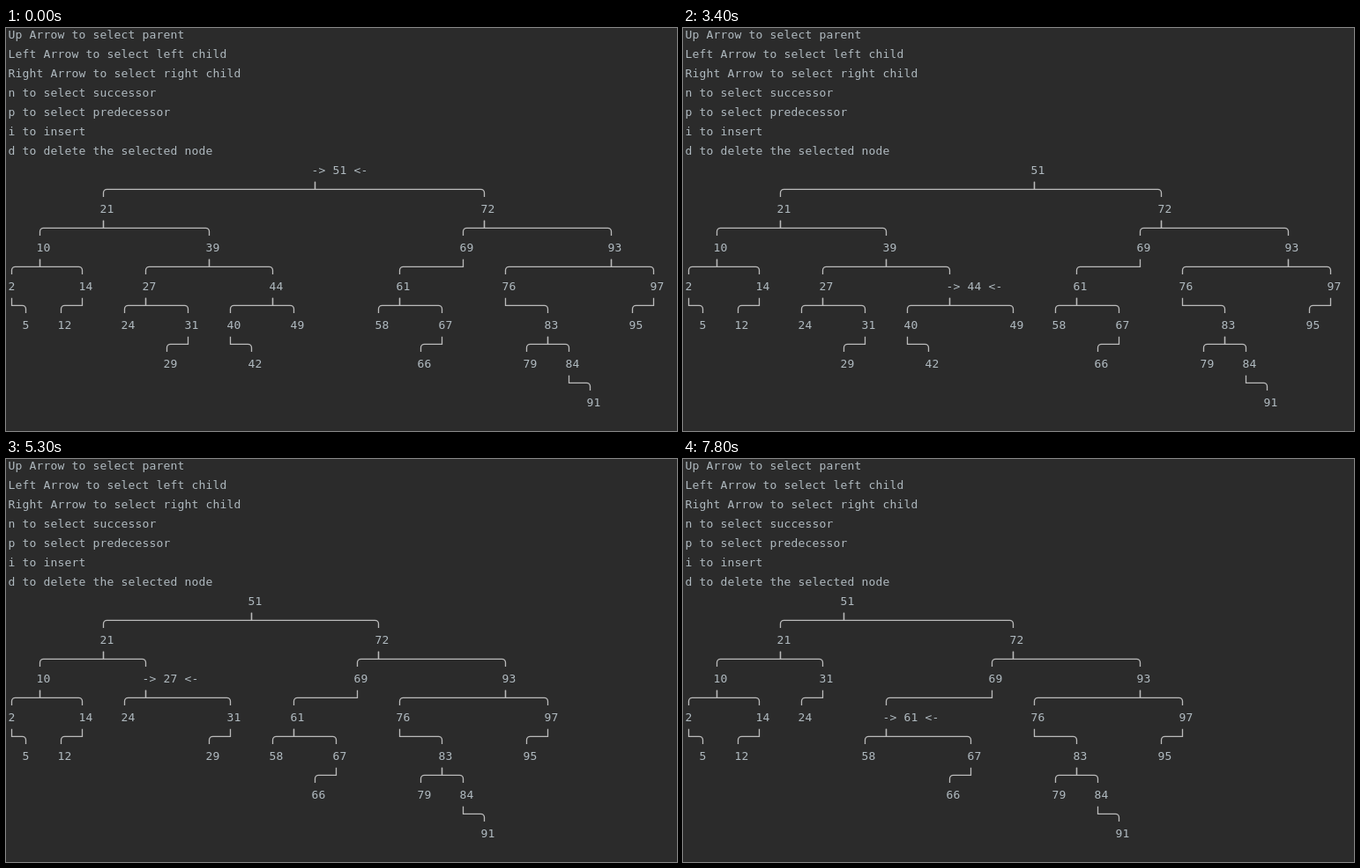
An HTML page with a canvas that plays this animation: 761 px wide and 458 px high, repeating every 8000 ms.

```html
<!DOCTYPE html>
<html lang="en">
<head>
<meta charset="utf-8">
<title>Binary search tree</title>
<style>
html, body { margin: 0; width: 100%; height: 100%; overflow: hidden; background: #2b2b2b; }
canvas { display: block; }
</style>
</head>
<body>
<canvas id="stage" width="761" height="458"></canvas>
<script>
const ctx = document.getElementById('stage').getContext('2d', { alpha: false });
const LOOP = 8000, CELL = 8, ROW = 22, CENTER = 6.5, BASE = 12;
const INK = '#b0bac0', LINE = '#bbbbbb';

const HELP = [
  'Up Arrow to select parent',
  'Left Arrow to select left child',
  'Right Arrow to select right child',
  'n to select successor',
  'p to select predecessor',
  'i to insert',
  'd to delete the selected node'
];

// Insertion order of the keys
const KEYS = '51 21 10 2 5 14 12 39 27 24 31 29 44 40 42 49 72 69 61 58 67 66 93 76 83 79 84 91 97 95';

// Key presses, each with its time in tenths of a second
const PRESSES = '7n 10n 13n 15n 16n 17n 24p 26pp 28p 30p 31p 33p 34p 36p 37p 38p ' +
  '46d 48d 50d 52d 53d 55d 57d 60p 62p 64p 65p 69n 72n 73n 74n 76n 77n 78n';

function insert(node, key) {
  if (!node) return { key, left: null, right: null };
  const side = key < node.key ? 'left' : 'right';
  node[side] = insert(node[side], key);
  return node;
}

function find(node, key) {
  while (node.key !== key) node = key < node.key ? node.left : node.right;
  return node;
}

function first(node) {
  while (node.left) node = node.left;
  return node;
}

function remove(node, key) {
  if (key !== node.key) {
    const side = key < node.key ? 'left' : 'right';
    return { ...node, [side]: remove(node[side], key) };
  }
  if (!node.right) return node.left;
  const next = first(node.right).key;
  return { key: next, left: node.left, right: remove(node.right, next) };
}

const inOrder = node => node ? [...inOrder(node.left), node.key, ...inOrder(node.right)] : [];

function press({ root, selected }, command) {
  if (command === 'd') {
    const { left, right } = find(root, selected);
    return { root: remove(root, selected), selected: right ? first(right).key : left.key };
  }
  const keys = inOrder(root);
  const step = command === 'n' ? 1 : -1;
  return { root, selected: keys[keys.indexOf(selected) + step] };
}

// One state per press, each starting at its time
const fullTree = KEYS.split(' ').map(Number).reduce(insert, null);
const states = [{ start: 0, root: fullTree, selected: fullTree.key }];
for (const token of PRESSES.split(' ')) {
  const commands = token.replace(/\d/g, '');
  const state = [...commands].reduce(press, states[states.length - 1]);
  states.push({ ...state, start: parseInt(token, 10) * 100 });
}

const centerX = col => col * CELL + CENTER;

function drawText(text, col, row) {
  [...text].forEach((ch, i) => ctx.fillText(ch, centerX(col + i), BASE + row * ROW));
}

// Each node takes its label's width plus one column, in key order.
function layout(node, selected, depth = 0, col = 0) {
  if (!node) return col;
  col = layout(node.left, selected, depth + 1, col);
  node.label = node.key === selected ? `-> ${node.key} <-` : String(node.key);
  node.col = col;
  node.row = HELP.length + depth * 2;
  return layout(node.right, selected, depth + 1, col + node.label.length + 1);
}

function drawNode(node) {
  drawText(node.label, node.col, node.row);
  const x = centerX(node.col), y = (node.row + 1) * ROW + 7.3;
  for (const child of [node.left, node.right]) {
    if (!child) continue;
    const childX = centerX(child.col);
    ctx.beginPath();
    ctx.moveTo(x, y - 8.6);
    ctx.lineTo(x, y);
    ctx.arcTo(childX, y, childX, y + 8.6, 4);
    ctx.lineTo(childX, y + 8.6);
    ctx.stroke();
    drawNode(child);
  }
}

function draw(time) {
  ctx.fillStyle = '#2b2b2b';
  ctx.fillRect(0, 0, 761, 458);
  ctx.font = '13px "DejaVu Sans Mono", monospace';
  ctx.textAlign = 'center';
  ctx.fillStyle = INK;
  ctx.strokeStyle = LINE;
  ctx.lineWidth = 1.3;
  HELP.forEach((text, i) => drawText(text, 0, i));
  const { root, selected } = states.filter(state => state.start <= time).pop();
  layout(root, selected);
  drawNode(root);
}

function tick() {
  draw(performance.now() % LOOP);
  requestAnimationFrame(tick);
}
tick();
</script>
</body>
</html>
```
